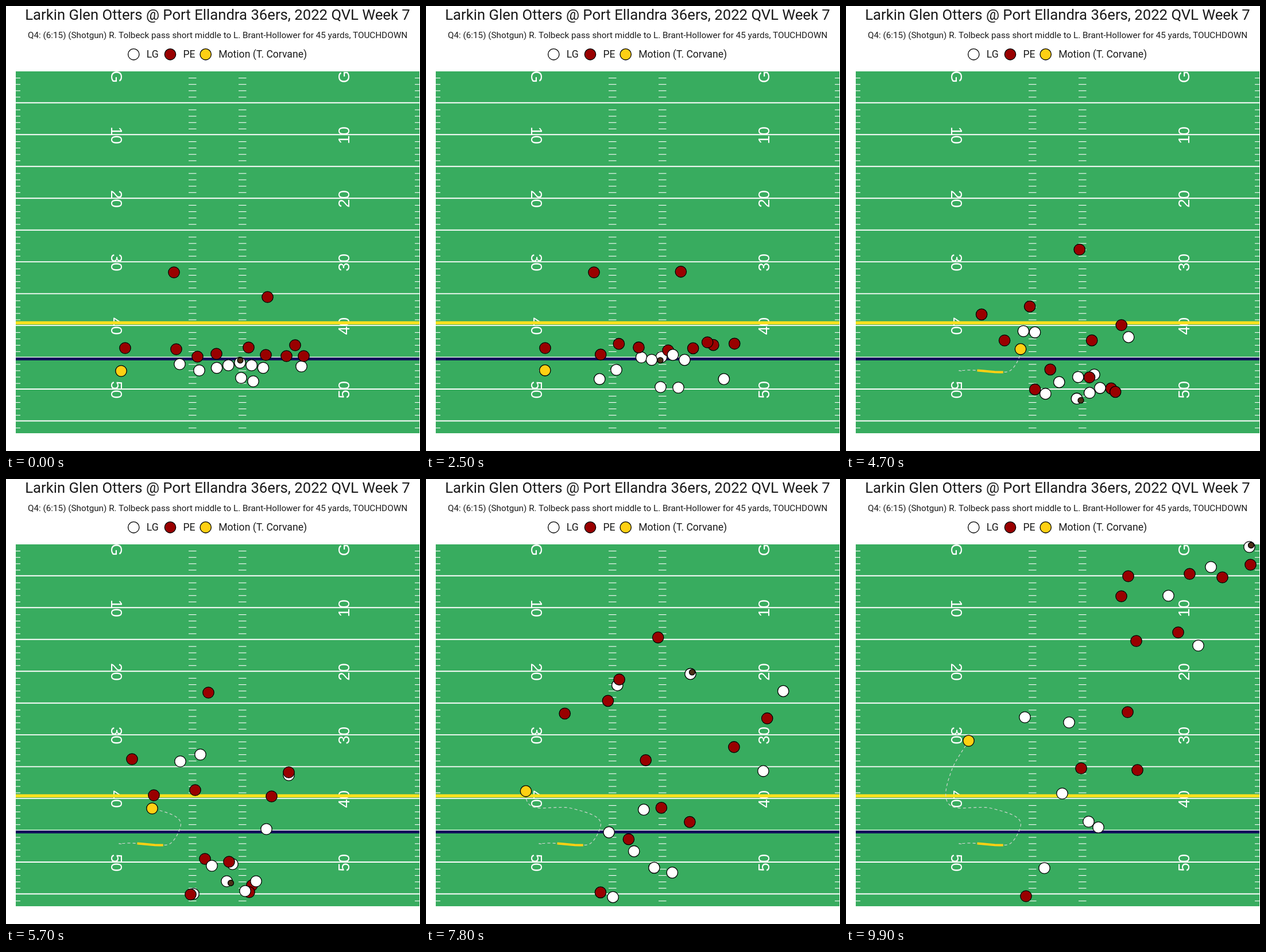
Recreate the animation shown at these times as an HTML page. Size 721 by 776 pixels, loop 10000 ms.

```html
<!DOCTYPE html>
<html lang="en">
<head>
<meta charset="utf-8">
<title>Play animation</title>
<style>
  html, body { margin: 0; width: 100%; height: 100%; overflow: hidden; background: #fff; }
  svg { display: block; }
  text { font-family: Roboto, "Open Sans", sans-serif; fill: #1a1a1a; }
  .yard { font: 27.5px "Liberation Sans", Arial, sans-serif; fill: #fff; text-anchor: middle; }
</style>
</head>
<body>
<svg id="stage" width="721" height="776" viewBox="0 0 721 776"></svg>
<script>
const LOOP = 10000, STEP = 100;
const SNAP = 3800, HANDS = 4200, THROW = 5900, CATCH = 6600;
const ROUTE_TIMES = [5700, 6900, 8700, 9900];
const WHITE = '#fff', RED = '#990000', GOLD = '#ffd013', BALL = '#4d2f17';
const stage = document.getElementById('stage');

function add(tag, attrs, text, parent = stage) {
  const node = document.createElementNS('http://www.w3.org/2000/svg', tag);
  for (const key in attrs) node.setAttribute(key, attrs[key]);
  if (text) node.textContent = text;
  return parent.appendChild(node);
}
const label = (x, y, size, text, anchor = 'start') =>
  add('text', { x, y, 'font-size': size, 'text-anchor': anchor }, text);
const dot = (cx, cy, fill, r = 9.7, parent = stage) =>
  add('circle', { cx, cy, r, fill, stroke: '#000', 'stroke-width': 1.3 }, '', parent);
const line = (x1, x2, y, stroke, width) =>
  add('path', { d: `M${x1} ${y}H${x2}`, stroke, 'stroke-width': width });

// Headings and legend
label(368.5, 23.5, 25.7, 'Larkin Glen Otters @ Port Ellandra 36ers, 2022 QVL Week 7', 'middle');
label(368.5, 55.5, 15.27, 'Q4: (6:15) (Shotgun) R. Tolbeck pass short middle to L. Brant-Hollower for 45 yards, TOUCHDOWN', 'middle');
function legend(x, fill, text) {
  dot(x, 84.3, fill);
  label(x + 22.5, 90, 17.6, text);
}
legend(222.3, WHITE, 'LG');
legend(286, RED, 'PE');
legend(347.7, GOLD, 'Motion (T. Corvane)');

// Field
const YARD = 11.095, yardY = n => 113.3 + n * YARD;
add('rect', { x: 17, y: 114, width: 703, height: 631, fill: '#38ac5f' });
for (let n = 1; n <= 56; n++) {
  if (n % 5 === 0) line(17, 720, yardY(n), '#fff', 1.9);
  else for (const [x, width] of [[17, 8], [318, 13.5], [405, 13.5], [712, 8]])
    line(x, x + width, yardY(n) + 1.2, '#fff', 1.1);
}
function yardLabel(text, y) {
  for (const [x, angle] of [[183, 90], [598, -90]])
    add('text', { class: 'yard', transform: `translate(${x} ${y}) rotate(${angle})` }, text);
}
yardLabel('G', 123.5);
for (let n = 10; n <= 50; n += 10) yardLabel(String(n), yardY(n) + 1.2);
line(17, 720, 615.6, '#10105a', 5);
line(17, 720, 552.5, '#fbe11f', 5.6);

// Smooth path through timed points [t, [x, y]]
function track(keys) {
  const last = keys.length - 1;
  const slope = (i, c) => (keys[i + 1][1][c] - keys[i][1][c]) / (keys[i + 1][0] - keys[i][0]);
  const tangent = (i, c) => {
    if (i === 0) return slope(0, c);
    if (i === last) return slope(last - 1, c);
    const before = keys[i][0] - keys[i - 1][0], after = keys[i + 1][0] - keys[i][0];
    return (slope(i - 1, c) * after + slope(i, c) * before) / (before + after);
  };
  return t => {
    let i = 0;
    while (i < last - 1 && t >= keys[i + 1][0]) i++;
    const [[t0, a], [t1, b]] = [keys[i], keys[i + 1]];
    const span = t1 - t0, u = (t - t0) / span, v = 1 - u;
    return [0, 1].map(c =>
      v * v * (1 + 2 * u) * a[c] + u * u * (3 - 2 * u) * b[c] +
      span * u * v * (v * tangent(i, c) - u * tangent(i + 1, c)));
  };
}
const parse = text => text.split(' ').map(p => p.split(',').map(Number));
const offset = ([x, y], dx, dy) => [x + dx, y + dy];

// Positions are pixel centres
const play = add('g', { transform: 'translate(.5 .5)' });
const trail = add('path', { fill: 'none', stroke: '#d0d5d0', 'stroke-width': 1.2, 'stroke-dasharray': '5 4.2' }, '', play);
const motion = add('path', { fill: 'none', stroke: GOLD, 'stroke-width': 4 }, '', play);
const movers = [];

function mover(fill, at, radius) {
  movers.push({ at, node: dot(0, 0, fill, radius, play) });
  return at;
}

// Spot at the snap, then the route; a shift moves the player there from the lineup
function player(fill, spot, route, lineup = spot, shift = [0, SNAP]) {
  const [set, start] = [parse(spot)[0], parse(lineup)[0]];
  const keys = new Map([[0, start], [shift[0], start], [shift[1], set], [SNAP, set]]);
  const points = parse(route);
  points.forEach((p, i) => keys.set(i === points.length - 1 ? LOOP - STEP : ROUTE_TIMES[i], p));
  return mover(fill, track([...keys]));
}
const offence = (...args) => player(WHITE, ...args);
const defence = (...args) => player(RED, ...args);
const lineman = (slot, route) =>
  offence(`${407 + 20.2 * slot},${621.5 + 4.5 * Math.abs(slot)}`, route);

const EARLY = [0, 2500], SLOW = [0, 3600], LATE = [2500, 3600];

offence('302,624', '303,492 251,415 451,299 561,203');
const receiver = offence('331,634', '338,480 388,422 554,242 702,118', '336,635', EARLY);
lineman(-2, '326,723 320,734 334,713 345,678');
lineman(0, '394,671 365,670 367,613 376,548');
offence('514,628', '492,516 591,471 631,255 635,153');
const passer = offence('408,664', '384,701 343,676 304,534 311,415', '409,648', EARLY);
offence('439,665', '453,610 572,584 582,412 613,290', '430,654', EARLY);

defence('300,487', '329,542 266,429 453,271 598,165', '292,464', LATE);
defence('441,454', '352,372 324,326 529,220 704,149', '455,507', SLOW);
defence('241,573', '219,488 184,482 338,312 479,204', '207,596', LATE);
defence('296,598', '257,551 264,478 390,285 491,169');
defence('333,611', '321,724 306,720 313,727');
defence('366,606', '346,662 352,669 362,570 409,504');
defence('421,601', '462,553 557,534 509,379 578,267', '422,595', SLOW);
defence('452,608', '388,667 356,585 432,389 505,282');
defence('488,610', '428,708 398,646 439,494 490,406');
defence('487,585', '492,511 579,488 601,318 655,171', '503,591', SLOW);
defence('518,610', '423,720 437,658 483,543 507,507');

lineman(-1, '358,674 372,628 388,424');
lineman(1, '416,718 397,702 422,597');
lineman(2, '435,701 428,704 439,607');

// Man in motion: across the formation, then a wheel route
const runner = mover(GOLD, track([
  [0, [200, 636]], [2300, [204, 635]], [3200, [228, 635]], [3600, [267, 638]], [4000, [286, 635]],
  [4600, [304, 602]], [5700, [254, 574]], [6900, [185, 571]], [8700, [184, 506]], [9900, [213, 456]]
]));

// The ball goes from the centre to the passer, through the air, then with the receiver
const centre = [407.5, 617.3];
const held = t => offset(passer(t), 7, 3);
const carried = t => offset(receiver(t), 3, -3);
function between(from, to, start, end, t) {
  const u = (t - start) / (end - start);
  return from.map((value, c) => value + (to[c] - value) * u);
}
mover(BALL, t =>
  t < SNAP ? centre :
  t < HANDS ? between(centre, held(HANDS), SNAP, HANDS, t) :
  t < THROW ? held(t) :
  t < CATCH ? between(held(THROW), carried(CATCH), THROW, CATCH, t) : carried(t), 5);

function runnerPath(from, to) {
  const points = [];
  for (let t = from; t <= to; t += STEP) points.push(runner(t).map(n => n.toFixed(2)).join(' '));
  return points.length ? 'M' + points.join('L') : '';
}

function render(now) {
  const t = Math.floor(now % LOOP / STEP) * STEP;
  for (const { at, node } of movers) {
    const [x, y] = at(t);
    node.setAttribute('cx', x.toFixed(2));
    node.setAttribute('cy', y.toFixed(2));
  }
  trail.setAttribute('d', runnerPath(0, t));
  motion.setAttribute('d', runnerPath(3200, Math.min(t, 3700)));
}

let start;
function frame(now) {
  start ??= now;
  render(now - start);
  requestAnimationFrame(frame);
}
render(0);
requestAnimationFrame(frame);
</script>
</body>
</html>
```
